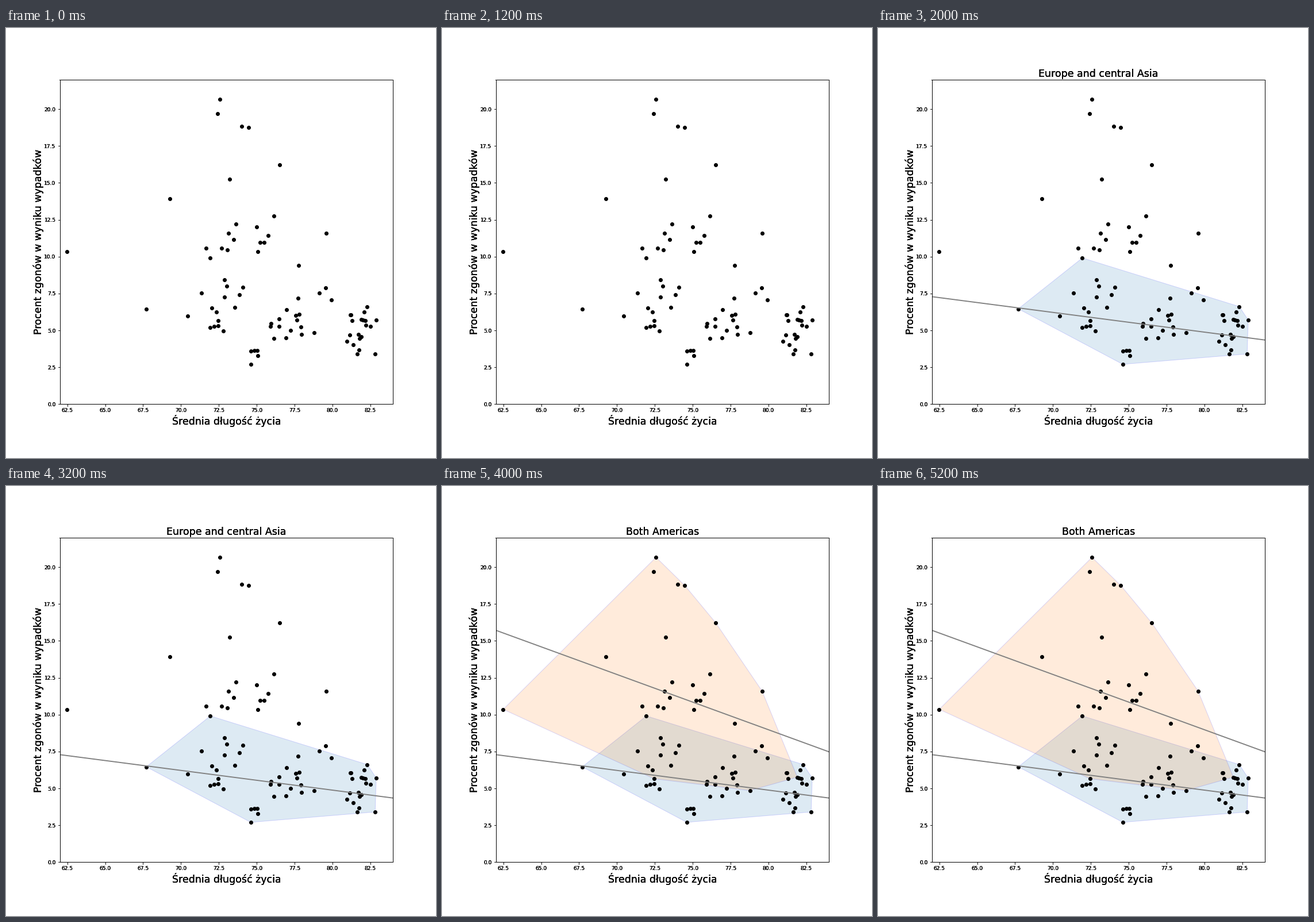
These frames come from a looping animation (748x748 px, 6 s). A matplotlib script:

```python
import matplotlib.pyplot as plt
import numpy as np
from matplotlib.animation import FuncAnimation

SIZE, DPI = 748, 72
LEFT, RIGHT, TOP, BOTTOM = 0.125 * SIZE, 0.9 * SIZE, 0.12 * SIZE, 654.4
XLIM, YLIM = (62, 84), (0, 22)
LAYERS = 3  # repeated text and frame give the heavier look

plt.rcParams.update({
    "font.family": "DejaVu Sans",
    "axes.titlesize": 17.4,
    "axes.titlepad": 4.7,
    "axes.labelsize": 17.35,
    "xtick.labelsize": 9,
    "ytick.labelsize": 9,
})

rng = np.random.default_rng(7)


def to_data(points):
    """Turn stage positions into data values."""
    x, y = np.array(points).T
    return np.column_stack([
        np.interp(x, (LEFT, RIGHT), XLIM),
        np.interp(y, (TOP, BOTTOM), YLIM[::-1]),
    ])


def cloud(center, radii, count):
    """Scatter points evenly over an ellipse, given on the stage."""
    angle = rng.uniform(0, 2 * np.pi, count)
    reach = np.sqrt(rng.uniform(0, 1, count))
    spread = np.column_stack([np.cos(angle), np.sin(angle)])
    return to_data(center + reach[:, None] * spread * radii)


def add_axes():
    ax = fig.add_axes([LEFT / SIZE, 1 - BOTTOM / SIZE,
                       (RIGHT - LEFT) / SIZE, (BOTTOM - TOP) / SIZE])
    ax.set(xlim=XLIM, ylim=YLIM)
    ax.set_xlabel("Średnia długość życia", labelpad=2.5)
    ax.set_ylabel("Procent zgonów w wyniku wypadków", labelpad=0.5)
    ax.set_xticks(np.arange(62.5, 84, 2.5))
    ax.set_yticks(np.arange(0, 22, 2.5))
    ax.xaxis.set_major_formatter("{x:.1f}")
    ax.yaxis.set_major_formatter("{x:.1f}")
    return ax


def add_region(outline, color, ends):
    shade = plt.Polygon(outline, facecolor=color, edgecolor="blue",
                        alpha=0.15, lw=1, zorder=0.5)
    base.add_patch(shade)
    trend, = base.plot(XLIM, ends, color="gray", lw=1.9, zorder=2)
    return shade, trend


fig = plt.figure(figsize=(SIZE / DPI, SIZE / DPI), dpi=DPI, facecolor="white")
layers = [add_axes() for _ in range(LAYERS)]
base = layers[0]
for ax in layers[1:]:
    ax.patch.set_visible(False)

europe = to_data([(244, 488.5), (355.5, 400), (628.5, 484.5),
                  (644, 508), (642.2, 567), (425.8, 585)])
americas = to_data([(106.5, 388.5), (372.3, 124), (422.5, 173.2),
                    (476.2, 238), (556.7, 356.5), (618.2, 506.5),
                    (535.7, 529.8), (368.7, 509.2)])
outliers = to_data([(368, 149), (410.2, 170.5), (389.5, 262.5),
                    (284.7, 297), (465.7, 326.5), (509, 413)])
points = np.vstack([
    europe, americas, outliers,
    cloud((370, 485), (60, 48), 14),
    cloud((438, 562), (14, 18), 4),
    cloud((490, 520), (38, 30), 13),
    cloud((609, 527), (27, 42), 16),
    cloud((400, 368), (60, 35), 11),
    cloud((543, 463), (45, 17), 4),
])
base.scatter(*points.T, s=36, color="black", zorder=1)

regions = [
    add_region(europe, "tab:blue", (7.29, 4.35)),
    add_region(americas, "tab:orange", (15.72, 7.48)),
]
titles = ["", "Europe and central Asia", "Both Americas"]


def update(step):
    for ax in layers:
        ax.set_title(titles[step])
    for i, parts in enumerate(regions):
        for part in parts:
            part.set_visible(i < step)


anim = FuncAnimation(fig, update, frames=3, interval=2000, repeat=True,
                     repeat_delay=0)
plt.show()
```
